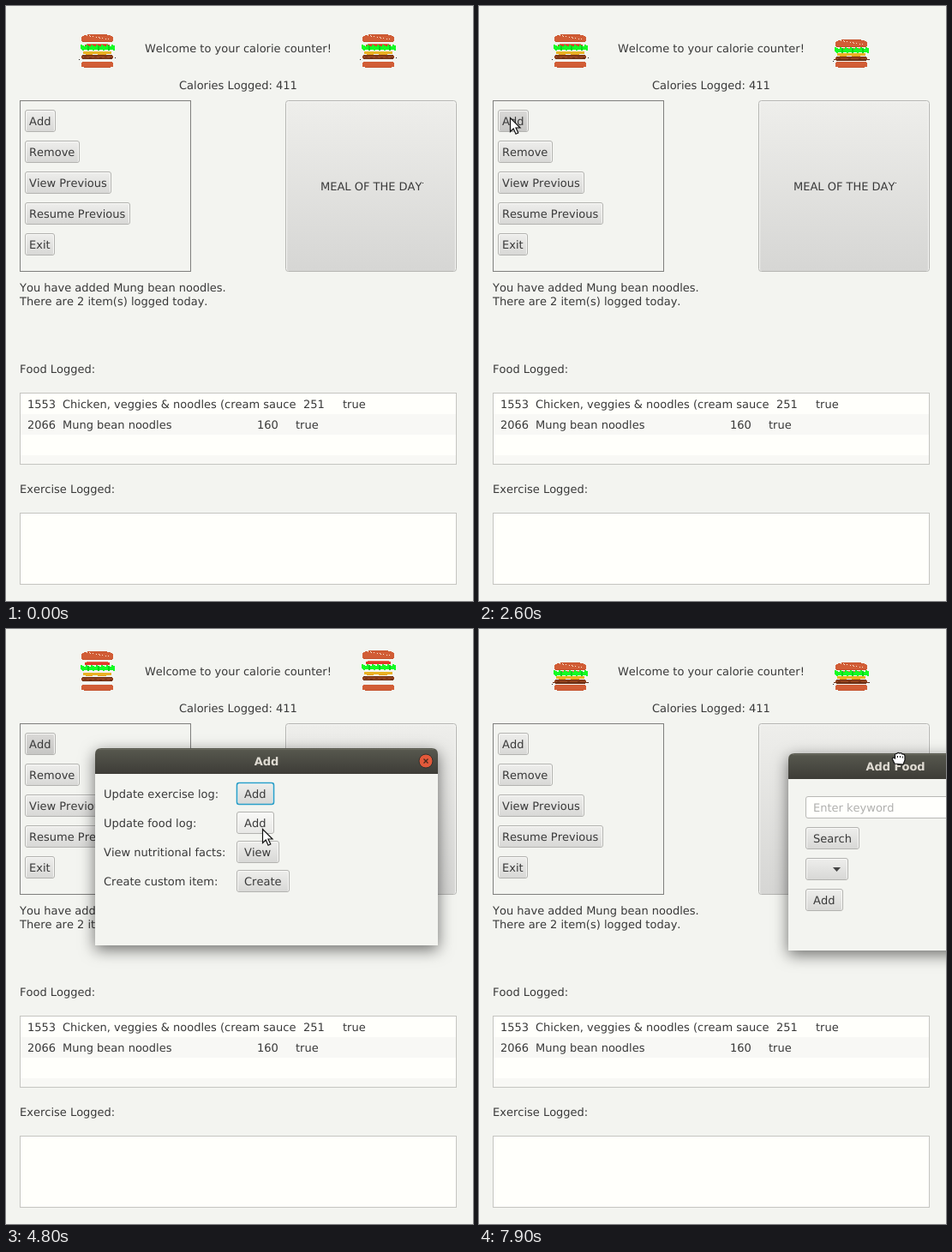
Write an HTML page that moves like this. It is 545 px wide and 694 px high and loops after 8000 ms.

```html
<!DOCTYPE html>
<html lang="en">
<head>
<meta charset="utf-8">
<title>Calorie counter</title>
<style>
html, body { margin: 0; width: 545px; height: 694px; overflow: hidden; background: #f3f4f0; }
svg { display: block; }
text { font: 13px "DejaVu Sans", sans-serif; font-kerning: none; text-rendering: geometricPrecision; fill: #393939; white-space: pre; }
.title { font-weight: bold; fill: #dfdbd2; text-anchor: middle; }
.hint { fill: #b0b0ae; }
.dialog { filter: drop-shadow(0 5px 9px rgba(0, 0, 0, .55)); }
.burger { shape-rendering: crispEdges; }
</style>
</head>
<body>
<svg id="stage" width="545" height="694" viewBox="0 0 545 694"></svg>
<script>
const LOOP = 8000, STEP = 100, BEAT = 890;
const stage = document.getElementById('stage');
const rect = (x, y, w, h, fill, extra = '') =>
  `<rect x="${x}" y="${y}" width="${w}" height="${h}" fill="${fill}" ${extra}/>`;
const text = (x, y, s, cls = '') => `<text x="${x}" y="${y}" class="${cls}">${s}</text>`;
const grad = (id, a, b) =>
  `<linearGradient id="${id}" x2="0" y2="1"><stop stop-color="${a}"/><stop offset="1" stop-color="${b}"/></linearGradient>`;
const group = (id, body, cls = '') => `<g id="${id}" class="${cls}">${body}</g>`;

function button(x, y, w, label, pad = 5, id = '') {
  return rect(x + .5, y + .5, w - 1, 25, '#b3b3b0', 'rx="2.5" stroke="#b3b3b0"') +
    rect(x + 1, y + 1, w - 2, 24, '#f8f8f6', 'rx="2"') +
    rect(x + 2, y + 2, w - 4, 23, 'url(#face)', `rx="1.5" ${id && `id="${id}"`}`) +
    text(x + pad, y + 18, label);
}

function list(y, rows) {
  let out = rect(16, y, 510, 84, '#fffffb');
  if (rows) out += rect(17, y + 25, 508, 24, '#f8f8f5') + rect(17, y + 73, 508, 10, '#f8f8f5');
  return out + rect(16.5, y + .5, 509, 83, 'none', 'stroke="#c5c5c1"');
}

function frame(w, title) {
  return `<g class="dialog"><path d="M0 230V7Q0 0 7 0H${w - 7}Q${w} 0 ${w} 7V230Z" fill="#f3f4f0"/>` +
    `<path d="M0 30V7Q0 0 7 0H${w - 7}Q${w} 0 ${w} 7V30Z" fill="url(#bar)"/></g>` +
    `<path d="M5 1.5H${w - 5}" stroke="#6a6b60"/>` + text(w / 2, 20, title, 'title');
}

const mainView =
  text(162, 54, 'Welcome to your calorie counter!') +
  text(202, 97, 'Calories Logged: 411') +
  rect(16.5, 110.5, 199, 199, 'none', 'stroke="#7f7f7d"') +
  button(22, 121, 36, 'Add', 5, 'mainAdd') +
  button(22, 157, 64, 'Remove') +
  button(22, 193, 101, 'View Previous') +
  button(22, 229, 123, 'Resume Previous') +
  button(22, 265, 35, 'Exit') +
  rect(326.5, 110.5, 199, 199, '#f6f6f4', 'rx="3" stroke="#b5b5b2"') +
  rect(328, 112, 196, 197, 'url(#big)', 'rx="2"') +
  text(367, 215, 'MEAL OF THE DAY') + rect(486, 206, 1, 1, '#222') +
  text(16, 333, 'You have added Mung bean noodles.') +
  text(16, 349, 'There are 2 item(s) logged today.') +
  text(16, 428, 'Food Logged:') + list(451, true) +
  text(25, 469, '1553') + text(66, 469, 'Chicken, veggies &amp; noodles (cream sauce') +
  text(347, 469, '251') + text(393, 469, 'true') +
  text(25, 493, '2066') + text(66, 493, 'Mung bean noodles') +
  text(293, 493, '160') + text(338, 493, 'true') +
  text(16, 568, 'Exercise Logged:') + list(591, false);

const addDialog = frame(400, 'Add') +
  '<circle cx="386" cy="15" r="8" fill="#e3593a" stroke="#33322e"/>' +
  '<path d="M383.5 12.5l5 5m0-5l-5 5" stroke="#4a2a1e" stroke-width="1.4"/>' +
  text(10, 58, 'Update exercise log:') + button(165, 40, 44, 'Add', 9) +
  rect(165.5, 40.5, 43, 25, 'none', 'id="focus" rx="2.5" stroke="#2a9fc9" stroke-width="1.6"') +
  text(10, 92, 'Update food log:') + button(165, 74, 44, 'Add', 9, 'foodAdd') +
  text(10, 126, 'View nutritional facts:') + button(165, 108, 50, 'View', 9) +
  text(10, 160, 'Create custom item:') + button(165, 142, 62, 'Create', 9);

const foodDialog = frame(250, 'Add Food') +
  rect(20.5, 50.5, 209, 25, '#fffffc', 'rx="2.5" stroke="#b9b9b6"') +
  text(29, 68, 'Enter keyword', 'hint') +
  button(20, 86, 63, 'Search', 9) + button(20, 122, 50, '') +
  '<path d="M52 133h9l-4.5 5z" fill="#444"/>' +
  button(20, 158, 44, 'Add', 9);

const arrow = '<path d="M.5 .5V16.5L4.2 13L7 19.3L9.8 18L7 12H12Z" fill="#fff" stroke="#111" stroke-width="1.2"/>';
const hand = '<path d="M-5 7L-7.5 2Q-8 0 -6 0L-4.5 1V-3Q-4.5 -5 -2.5 -4.5Q-1 -6.5 1 -5Q3 -6 4 -4Q7 -4.5 7 -1.5V3L5 8Z" fill="#fff" stroke="#111" stroke-width="1.2"/>' +
  '<path d="M-1.5 -2v2M1.5 -2v2M4.3 -1.5v2" stroke="#111"/>';

stage.innerHTML = '<defs>' + grad('face', '#ededeb', '#d8d8d6') + grad('down', '#d9d8d6', '#c6c6c4') +
  grad('light', '#f8f8f6', '#e7e7e5') + grad('big', '#eeeeeb', '#d6d6d4') + grad('bar', '#58594f', '#3d3c37') +
  '</defs>' + rect(0, 0, 545, 694, '#f3f4f0') + mainView +
  group('left', '', 'burger') + group('right', '', 'burger') +
  group('addBox', addDialog) + group('foodBox', foodDialog) +
  group('arrow', arrow) + group('hand', hand);

const el = id => document.getElementById(id);

// Squash per beat: [start, amount], 0 = open, 1 = closed.
const squash = [[0, .6], [50, .27], [135, 0], [320, .07], [372, .13], [460, .33], [540, .54], [610, .8], [680, 1], [850, .6]];

function burger(s) {
  const at = (a, b) => Math.round(a + (b - a) * s);
  const top = at(24, 39), bunH = at(10, 9);
  const tomato = at(36, 49), leaf = at(41, 48), cheese = at(50, 55), patty = at(55, 59);
  let out = rect(4, tomato + 1, 29, 3, '#e2382a') + rect(6, tomato, 25, 1, '#ef6a55');
  out += rect(7, top, 23, 1, '#c9562f') + rect(3, top + 1, 31, 1, '#cf5a33') + rect(1, top + 2, 35, 1, '#d15d36') +
    rect(0, top + 3, 37, bunH - 4, '#d15d36') + rect(1, top + bunH - 1, 35, 1, '#c4522d');
  for (let i = 0; i < 10; i++) out += rect((i * 11 + 5) % 29 + 4, top + 1 + i * 2 % 5, 1, 1, '#fbe6cf');
  out += rect(0, 66, 37, 5, '#d15d36') + rect(1, 65, 35, 1, '#d15d36') + rect(3, 71, 31, 1, '#c4522d');
  out += rect(2, cheese, 33, 3, '#e9b224') + rect(5, cheese + 3, 8, 1, '#e9a01c') + rect(19, cheese + 3, 10, 1, '#e9a01c');
  out += rect(0, patty + 1, 37, 3, '#93421e') + rect(1, patty, 35, 1, '#6d2f14') + rect(1, patty + 4, 35, 1, '#6d2f14');
  for (let i = 0; i < 6; i++) out += rect(3 + i * 6, patty + 2 + i % 2, 3, 1, '#6d2f14');
  out += rect(0, leaf + 2, 37, 4, '#14fb24');
  for (let i = 0; i < 20; i++) {
    const up = i * 7 % 3, down = i * 5 % 3;
    out += rect(i * 2 - 1, leaf + up, 2, 5 - up + down, i % 6 == 4 ? '#0bd31d' : '#14fb24');
  }
  if (s > .3) out += rect(-3, patty + 5, 1, 1, '#222') + rect(39, patty + 3, 1, 1, '#222');
  if (s > .9) out += rect(-2, patty + 3, 41, 1, '#6d2f14');
  return out;
}

function drawBurger(id, x, t) {
  const p = t % BEAT, s = squash.filter(k => k[0] <= p).pop()[1], g = el(id);
  if (g.pose === s) return;
  g.pose = s;
  g.setAttribute('transform', `translate(${x} 0)`);
  g.innerHTML = burger(s);
}

// Each path is a list of [time, x, y]; it is visible from its first time to its end.
const arrowPaths = [
  { end: 400, keys: [[200, 3, 12], [300, 0, 9]] },
  { end: 2700, keys: [[1400, 150, 120], [1600, 48, 163], [1800, 32, 150], [2000, 36, 130]] },
  { end: 2800, keys: [[2700, 508, 100]] },
  { end: 6700, keys: [[4600, 318, 192], [4800, 299, 233], [5200, 299, 233], [5400, 292, 225]] }
];
const addPaths = [{ end: 5600, keys: [[3700, 331, 136], [3900, 205, 141], [4100, 128, 145], [4400, 104, 139]] }];
const foodPaths = [{ end: LOOP, keys: [[7500, 520, 139], [7700, 420, 142], [7900, 361, 145]] }];

function locate(paths, t) {
  const path = paths.find(p => t >= p.keys[0][0] && t < p.end);
  if (!path) return null;
  const i = path.keys.findLastIndex(k => k[0] <= t), a = path.keys[i], b = path.keys[i + 1];
  if (!b) return [a[1], a[2]];
  const u = (t - a[0]) / (b[0] - a[0]);
  return [1, 2].map(n => Math.round(a[n] + (b[n] - a[n]) * u));
}

function place(id, pos) {
  el(id).style.display = pos ? '' : 'none';
  if (pos) el(id).setAttribute('transform', `translate(${pos[0]} ${pos[1]})`);
}

const face = (id, name) => el(id).setAttribute('fill', `url(#${name})`);
const within = (t, a, b) => t >= a && t < b;

function render(ms) {
  const t = Math.floor(ms % LOOP / STEP) * STEP;
  drawBurger('left', 88, t + 40);
  drawBurger('right', 416, t);
  const box = locate(addPaths, t), food = locate(foodPaths, t);
  place('addBox', box);
  place('foodBox', food);
  place('arrow', locate(arrowPaths, t));
  place('hand', food ? [food[0] + 129, food[1] + 5] : box && t < 4600 ? [box[0] + 230, box[1] + 14] : null);
  const hover = within(t, 1900, 2300) || within(t, 5600, 6700);
  face('mainAdd', within(t, 2300, 5600) ? 'down' : hover ? 'light' : 'face');
  face('foodAdd', t >= 4700 ? (t == 5300 ? 'down' : 'light') : 'face');
  el('focus').style.display = t >= 4400 ? '' : 'none';
}

const start = performance.now();
function tick() {
  render(performance.now() - start);
  requestAnimationFrame(tick);
}
tick();
</script>
</body>
</html>
```
